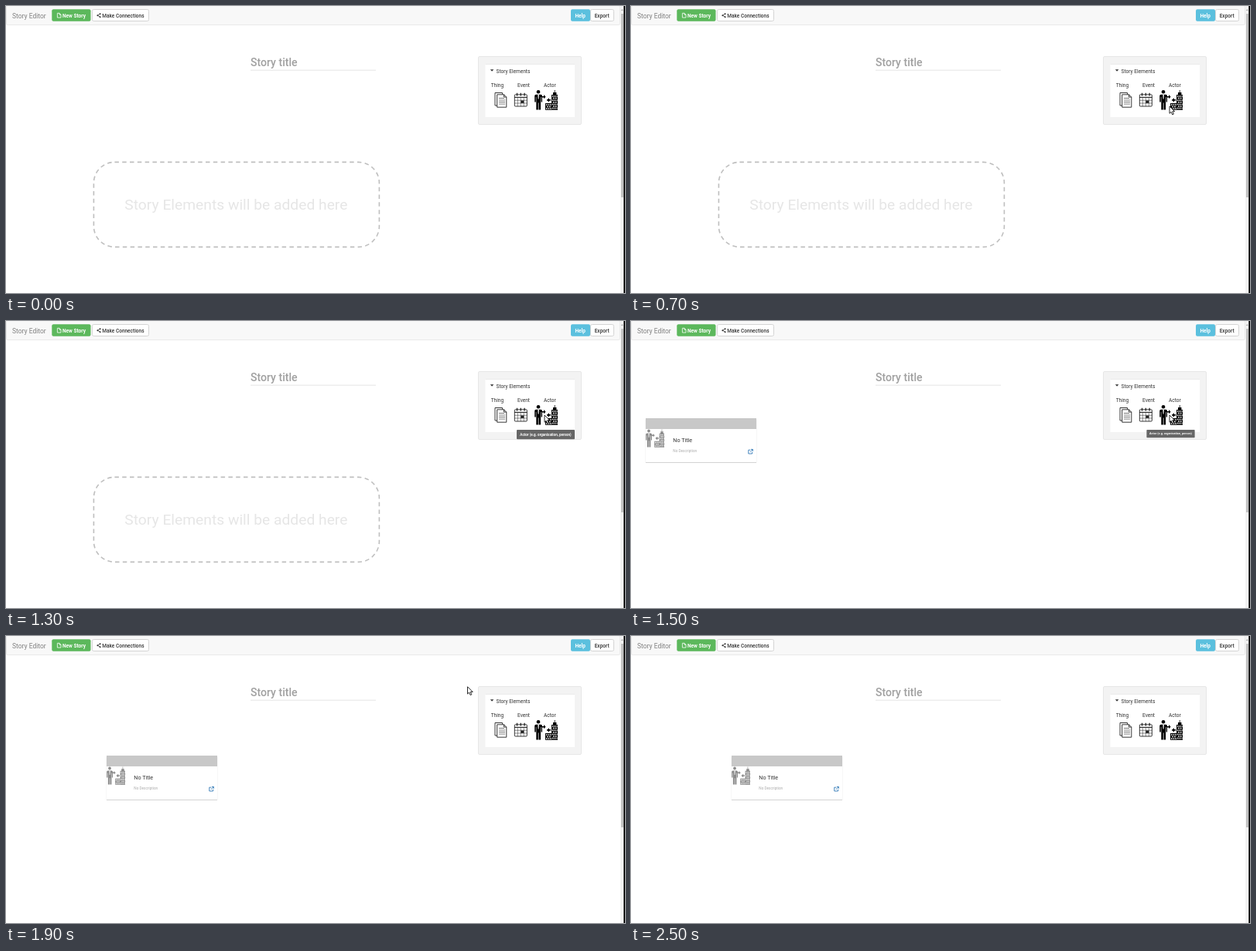
These frames come from a looping animation (800x372 px, 3000 ms). An HTML page:

```html
<!DOCTYPE html>
<html lang="en">
<head>
<meta charset="utf-8">
<title>Story editor</title>
<style>
  html, body { margin: 0; width: 100%; height: 100%; overflow: hidden; background: #fff; }
  svg { display: block; width: 800px; height: 372px; }
  text { font: 6.55px Roboto, sans-serif; fill: #333; }
  .button { font-weight: 500; font-size: 6.5px; }
  .light { fill: #fff; font-weight: 700; }
</style>
</head>
<body>
<svg viewBox="0 0 800 372">
  <defs>
    <g id="file" fill="none" stroke="#fff" stroke-width=".8">
      <path d="M.4 .4H3L5 2.4V6.1H.4ZM3 .4V2.4H5"/>
    </g>
    <!-- Person, arrows and two buildings; the origin is the top left corner -->
    <g id="actor">
      <circle cx="5" cy="2.8" r="2.3"/>
      <path d="M2 6.2H8.2Q10 6.2 10 8V16H8.6V9.5H8V26H5.5V17H4.8V26H2.3V9.5H1.8V16H.2V8Q.2 6.2 2 6.2Z"/>
      <path d="M4.3 6.2H5.9L5.6 11.5L5.1 12.5L4.6 11.5Z" fill="#fff"/>
      <path d="M10 8.4H12V6.6L14.6 9.2L12 11.8V10H10ZM21 12.6H19V10.8L15.6 13.4L19 16V14.2H21Z"/>
      <path d="M14 17.5H22V26.3H14ZM22 26.3V6.5H24V3.5H25.8V.5H26.6V3.5H28.4V6.5H30V26.3Z"/>
      <path stroke="#fff" stroke-width="1.5" stroke-dasharray="1.6 1.1" fill="none"
        d="M15 19.4H22M16.3 22H22M15 24.6H22M23 8.5H29.5M24.2 11.1H29.5M23 13.7H29.5M24.2 16.3H29.5M23 18.9H29.5M24.2 21.5H29.5M23 24.1H29.5"/>
    </g>
  </defs>

  <!-- Navigation bar -->
  <rect x=".5" y="-.5" width="793" height="25" rx="2" fill="#f8f8f8" stroke="#e9e9e9"/>
  <text x="8" y="15.8" style="font-size:8.5px;fill:#808080">Story Editor</text>
  <rect x="59.3" y="4.3" width="50.2" height="15.5" rx="2" fill="#5cb85c"/>
  <use href="#file" x="66" y="8.9"/>
  <text x="73" y="14.6" class="button light">New Story</text>
  <rect x="111.5" y="4.5" width="73" height="15" rx="2" fill="#fff" stroke="#d4d4d4"/>
  <path d="M121.6 10.2L118.4 12.2L121.6 14.2" fill="none" stroke="#333" stroke-width=".7"/>
  <g fill="#333"><circle cx="121.6" cy="10.2" r="1"/><circle cx="118.4" cy="12.2" r="1"/><circle cx="121.6" cy="14.2" r="1"/></g>
  <text x="124.3" y="14.6" class="button">Make Connections</text>
  <rect x="730" y="4.3" width="25" height="15.5" rx="2" fill="#5bc0de"/>
  <text x="735.5" y="14.6" class="button light">Help</text>
  <rect x="755.5" y="4.5" width="30" height="15" rx="2" fill="#fff" stroke="#d4d4d4"/>
  <text x="760.7" y="14.6" class="button">Export</text>

  <!-- Scrollbar and window edge -->
  <rect x="794" width="4.5" height="372" fill="#f3f3f3"/>
  <path d="M794.8 6L796.3 4L797.8 6Z" fill="#aaa"/>
  <rect x="795" y="10" width="3" height="238" fill="#c1c1c1"/>
  <rect x="798.3" width="1.7" height="372" fill="#000"/>

  <text x="316" y="78.4" style="font-size:14.1px;font-weight:500;fill:#a0a0a0">Story title</text>
  <path d="M316 83.2H478" stroke="#e4e4e4"/>

  <!-- Element palette -->
  <rect x="610.5" y="65.5" width="133" height="88" rx="1.5" fill="#f3f3f3" stroke="#e7e7e7"/>
  <rect x="619.5" y="75" width="115.5" height="69" fill="#fff"/>
  <path d="M619.5 75.5H735" stroke="#ebebeb"/>
  <path d="M625.8 82.2H630.4L628.1 84.8Z" fill="#333"/>
  <text x="633.5" y="86.5">Story Elements</text>
  <text x="626.7" y="104.5">Thing</text>
  <text x="661" y="104.5">Event</text>
  <text x="695" y="104.5">Actor</text>
  <g fill="#fff" stroke="#222" stroke-width=".9">
    <path d="M632 112.5H641.5V129H632Z"/>
    <path d="M634.7 114.8H643.5L646.8 118V131.2H634.7ZM643.5 114.8V118H646.8"/>
    <path d="M637 119.5H644M637 122H645M637 124.5H645M637 127H645" stroke-width=".6"/>
  </g>
  <g fill="none" stroke="#222">
    <rect x="657.3" y="114.8" width="16" height="15.2" rx="1" stroke-width=".9"/>
    <path d="M657 118.4H673.5" stroke-width="1.1"/>
    <path d="M660.5 112.8V116.6M665.3 112.8V116.6M670.1 112.8V116.6" stroke-width="1.3"/>
    <path d="M657 122.3H673.5M657 126H673.5M661.3 119V130M665.3 119V130M669.3 119V130" stroke-width=".5"/>
    <path d="M665.3 124.2H669.3" stroke-width="3.4"/>
  </g>
  <use href="#actor" x="683" y="108.5"/>

  <g id="dropZone">
    <rect x="113.4" y="202.4" width="369" height="110" rx="27" fill="none" stroke="#bfbfbf" stroke-width="1.6" stroke-dasharray="5.5 4.3"/>
    <text x="153.3" y="264" style="font-size:19.25px;fill:#e6e6e6">Story Elements will be added here</text>
  </g>

  <g id="card">
    <rect x="-.3" y="1" width="143.6" height="57" rx="1" fill="#e4e4e4"/>
    <rect y="56" width="143" height="1.7" fill="#ccc"/>
    <rect width="143" height="57" fill="#fff"/>
    <rect width="143" height="14" fill="#c8c8c8"/>
    <use href="#actor" transform="translate(0 14) scale(.8 .9)" opacity=".45"/>
    <text x="35.3" y="30.8" style="font-size:7.2px">No Title</text>
    <text x="35.3" y="44.4" style="font-size:4.7px;fill:#aaa">No Description</text>
    <path d="M135.3 41.2H132.8V46H137.6V43.8M135 43.8L138.3 40.5M136 40.4H138.4V42.8" fill="none" stroke="#337ab7" stroke-width=".9"/>
  </g>

  <g id="tooltip">
    <rect x="-37.5" width="75" height="12.3" rx="1" fill="#666"/>
    <text y="7.8" text-anchor="middle" class="light" style="font-size:4.55px">Actor (e.g. organisation, person)</text>
  </g>

  <path id="cursor" d="M0 0V9.3L2.1 7.3L3.6 10.8L5.3 10.1L3.8 6.7H6.7Z" fill="#fff" stroke="#111" stroke-width=".9"/>
</svg>
<script>
const LOOP = 3000, STEP = 100;
const [dropZone, card, tooltip, cursor] =
  ["dropZone", "card", "tooltip", "cursor"].map(id => document.getElementById(id));

// Keys: [time, x, y]
const cursorPath = [
  [100, 786, 352], [200, 752, 297], [400, 689, 218], [500, 686, 178],
  [700, 696, 130], [800, 696, 122], [1700, 696, 122], [1800, 664, 92],
  [2000, 529, 39.5], [2100, 494, 17], [2200, 466, 2], [2300, 440, -14]
];
// Keys: [time, scale]
const tooltipScale = [[700, 0], [800, .6], [900, 1], [1400, 1], [1500, .83], [1600, .17], [1700, 0]];

function sample(keys, time) {
  const next = keys.findIndex(key => key[0] > time);
  if (next < 1) return keys[next ? keys.length - 1 : 0].slice(1);
  const [from, to] = [keys[next - 1], keys[next]];
  const part = (time - from[0]) / (to[0] - from[0]);
  return from.slice(1).map((value, i) => value + (to[i + 1] - value) * part);
}

function show(element, visible, transform) {
  element.setAttribute("visibility", visible ? "visible" : "hidden");
  if (transform) element.setAttribute("transform", transform);
}

function draw(now) {
  const time = Math.floor(now % LOOP / STEP) * STEP;
  const [scale] = sample(tooltipScale, time);
  show(dropZone, time < 1500);
  show(card, time >= 1500, time < 1600 ? "translate(19 126)" : "translate(130 155)");
  show(tooltip, scale > 0, `translate(697.5 141) scale(${scale})`);
  show(cursor, time >= 100 && time < 2300, `translate(${sample(cursorPath, time)})`);
}

function tick(now) {
  draw(now);
  requestAnimationFrame(tick);
}
draw(0);
requestAnimationFrame(tick);
</script>
</body>
</html>
```
